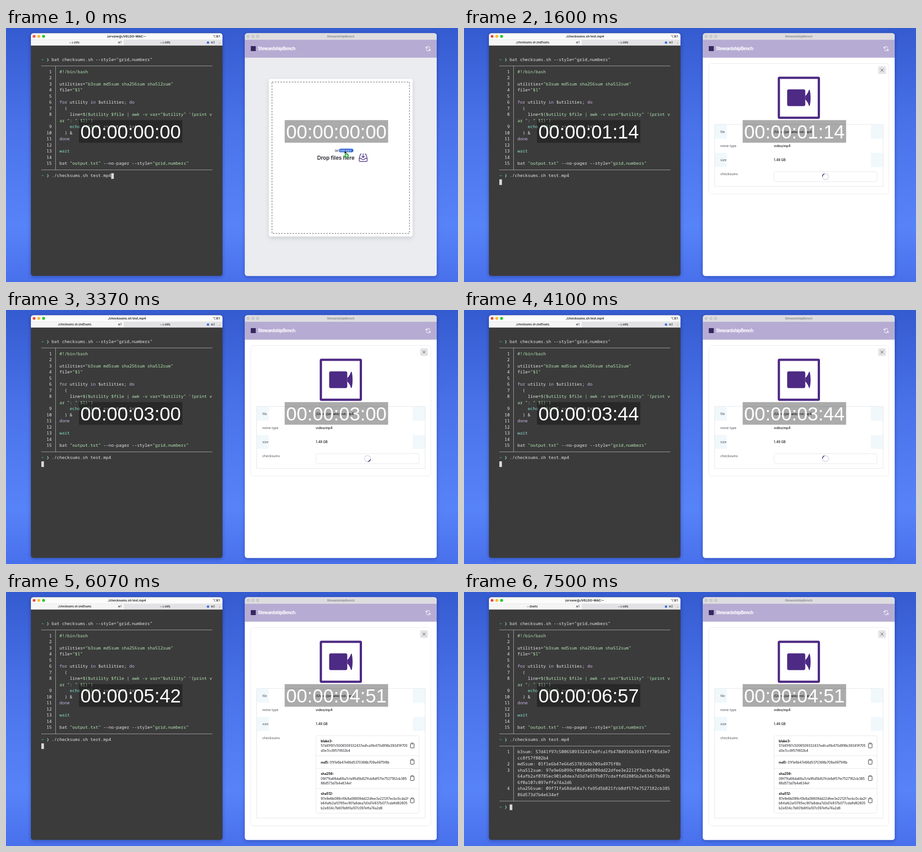
Animation of 998 by 561 pixels, one loop 8.82 s. Source, as an HTML page:

```html
<!DOCTYPE html>
<html lang="en">
<head>
<meta charset="utf-8">
<title>Checksum race</title>
<style>
html, body { margin: 0; width: 100%; height: 100%; overflow: hidden; background: #4c75ec; }
svg { display: block; width: 100vw; height: 100vh; }
text { white-space: pre; font-family: Inter, "DejaVu Sans", sans-serif; }
.mono { font: 500 9.524px "Noto Sans Mono", "DejaVu Sans Mono", monospace; }
.clock { font: 42px "Liberation Sans", Arial, sans-serif; fill: #fff; }
</style>
</head>
<body>
<svg id="stage" viewBox="0 0 998 561" xmlns="http://www.w3.org/2000/svg"></svg>
<script>
const LOOP = 8820, START = 366, FRAME = 1000 / 30;
const LEFT_STOP = 417, RIGHT_STOP = 291;
const CELL = 5.714, ROW = 13.5, WRAP = 59;
const INK = { t: '#e8e8e8', s: '#b4e6b4', k: '#cdb2e2', b: '#86dccb', p: '#7fe3b0' };
const USER = 'jorvane';
const SHELL_TITLE = USER + '@JVELDO-MAC:~', RUN = './checksums.sh test.mp4';
const APP = 'StewardshipBench';

const HASH = {
  blake3: '57d41f97c5006509332437edfca1fb470d916b39341ff705d3e7cc8f57f802b4',
  md5: '01f1e6b47e66d5370366b709a4975f8b',
  sha256: '09f71fa68da68a7cfa95d5b821fcb8df57fe7527182cb38586d573d7b4e634ef',
  sha512: '97e9e6b099cf0b8a06809dd22dfee3e2212f7ecbc0cda2fb64afb2af0785ec901a8dea7d3d7e937b077cdaffd92805b2e834c7b601b6f0a107c097effa74a2d6'
};

// Each line: number, then ink and text in turn.
const CODE = [
  [1, 's', '#!/bin/bash'],
  [2],
  [3, 't', 'utilities=', 's', '"b3sum md5sum sha256sum sha512sum"'],
  [4, 't', 'file=', 's', '"$1"'],
  [5],
  [6, 'k', 'for', 't', ' utility ', 'k', 'in', 't', ' $utilities; ', 'k', 'do'],
  [7, 't', '  ('],
  [8, 't', '    line=', 's', '$($utility $file | awk -v var="$utility" \'{print v'],
  ['', 's', 'ar ": " $1}\')'],
  [9, 'b', '    echo ', 's', '"$line"', 't', ' >> output.txt'],
  [10, 't', '  ) &'],
  [11, 'k', 'done'],
  [12],
  [13, 'b', 'wait'],
  [14],
  [15, 't', 'bat ', 's', '"output.txt"', 't', ' --no-pager --style=', 's', '"grid,numbers"']
];

const esc = s => String(s).replace(/&/g, '&amp;').replace(/</g, '&lt;').replace(/>/g, '&gt;');
const col = c => 78 + c * CELL;
const rowY = r => 69.5 + r * ROW;
const chunks = (s, n) => s.match(new RegExp('.{1,' + n + '}', 'g'));

function rect(x, y, w, h, fill, extra = '') {
  return `<rect x="${x}" y="${y}" width="${w}" height="${h}" fill="${fill}" ${extra}/>`;
}
function label(x, y, size, fill, s, extra = '') {
  return `<text x="${x}" y="${y}" font-size="${size}" fill="${fill}" ${extra}>${esc(s)}</text>`;
}
function dot(x, y, r, fill, extra = '') {
  return `<circle cx="${x}" cy="${y}" r="${r}" fill="${fill}" ${extra}/>`;
}
function path(d, stroke, width = 1, extra = '') {
  return `<path d="${d}" fill="none" stroke="${stroke}" stroke-width="${width}" ${extra}/>`;
}
function mono(c, r, runs, extra = '') {
  let s = '';
  for (let i = 0; i < runs.length; i += 2) s += `<tspan fill="${INK[runs[i]]}">${esc(runs[i + 1])}</tspan>`;
  return `<text class="mono" x="${col(c)}" y="${rowY(r) + 3.4}" ${extra}>${s}</text>`;
}
const MID = 'text-anchor="middle"', BOLD = 'font-weight="600"';

function prompt(r, cmd) {
  return mono(0, r, ['b', '~']) + mono(2, r, ['p', '❯']) + mono(4, r, ['t', cmd]);
}
function grid(top, bottom, lines) {
  const y1 = rowY(top) + .8, y2 = rowY(bottom) + .8, x = col(5.5);
  return path(`M78 ${y1}H455.5M78 ${y2}H455.5M${x} ${y1}V${y2}`, '#b5b5b5', .9) +
    lines.map(([n, ...runs], i) =>
      mono(4, top + 1 + i, ['t', n], 'text-anchor="end"') + mono(7, top + 1 + i, runs)).join('');
}
function outputLines() {
  const names = [['b3sum', 'blake3'], ['md5sum', 'md5'], ['sha512sum', 'sha512'], ['sha256sum', 'sha256']];
  return names.flatMap(([tool, key], n) =>
    chunks(tool + ': ' + HASH[key], WRAP).map((s, i) => [i ? '' : n + 1, 't', s]));
}

function terminal() {
  const round = 'M55 38.5V17a5.5 5.5 0 0 1 5.5-5.5H472.5a5.5 5.5 0 0 1 5.5 5.5V38.5Z';
  return rect(55, 11.5, 423, 536, '#3a3a3a', 'rx="5.5" filter="url(#shadow)"') +
    `<path d="${round}" fill="#fbfbfb"/>` +
    rect(55, 26, 205, 12.5, '#f5f5f6') + rect(260, 26, 218, 12.5, '#e3e3e6') +
    path('M55 26H478', '#dcdce0', .6) +
    ['#f25f57', '#f7bd2e', '#2bc840'].map((c, i) => dot(62 + i * 10.5, 18.5, 3.3, c)).join('') +
    dot(62, 18.5, 1, '#8c1a10', 'id="busy"') +
    label(266.5, 20.9, 6.8, '#333', '', MID + ' font-weight="700" id="title"') +
    label(456.5, 20.6, 6.6, '#333', '⌥⌘1', BOLD) +
    label(151, 34.4, 5.8, '#222', '', MID + ' font-weight="600" id="tab"') +
    label(247, 34.3, 5.6, '#333', '⌘1', BOLD) +
    label(351.5, 34.4, 5.8, '#222', '~ (-zsh)', MID + ' font-weight="600"') +
    dot(446, 32.2, 2.6, '#3f6be0') + label(452, 34.3, 5.6, '#333', '⌘2', BOLD) +
    label(469.5, 34.6, 7, '#999', '+') +
    prompt(0, 'bat checksums.sh --style="grid,numbers"') + grid(1, 18, CODE) +
    prompt(19, RUN) +
    `<g id="output">${grid(20, 29, outputLines())}</g><g id="again">${prompt(30, '')}</g>` +
    rect(0, 0, 5.8, 12.4, '#d9d9d9', 'id="caret"');
}

function dropPage() {
  const inbox = 'M784.5 278.5H782.6L779.8 288V293a1.8 1.8 0 0 0 1.8 1.8H795.6a1.8 1.8 0 0 0 1.8-1.8V288L794.6 278.5H792.7M779.8 288H784.5L786 290.6H791.2L792.7 288H797.4M788.6 277.5V286M785.6 283.2L788.6 286.2L791.6 283.2';
  return rect(527.5, 65.5, 423.5, 476, '#ebecf0') + rect(527.5, 530, 423.5, 17.5, '#ebecf0', 'rx="5"') +
    rect(580.5, 112.5, 317, 348, '#fff', 'rx="4" filter="url(#soft)"') +
    rect(587.3, 119.3, 303.6, 334.4, 'none', 'stroke="#555" stroke-dasharray="3.6 2.6"') +
    label(687, 291.2, 11.7, '#26262e', 'Drop files here', BOLD) +
    path(inbox, '#4a2f83', 1.4, 'stroke-linejoin="round" stroke-linecap="round"') +
    `<g id="drag">${rect(726.3, 268.3, 7.4, 5, '#fff', 'stroke="#888" stroke-width=".6"')}
      ${rect(727.3, 270.3, 5.4, 1.8, '#555')}${rect(735, 266.4, 32, 8.2, '#2f66d8', 'rx="4"')}
      ${label(737, 272.7, 6.1, '#fff', 'test.mp4')}</g>` +
    `<path d="M747.3 270V278.4L749.2 276.7L750.5 279.5L751.7 278.9L750.4 276.2H753Z" fill="#111" stroke="#fff" stroke-width=".5"/>` +
    dot(752.2, 281.8, 4.8, '#2fb344') + path('M749.6 281.8H754.8M752.2 279.2V284.4', '#fff', 1.2);
}

function clipboard(y) {
  return `<g transform="translate(897 ${y})">${rect(-4, -4.4, 8, 9.8, 'none', 'rx="1.4" stroke="#222"')}
    ${rect(-2, -5.8, 4, 2.6, '#fff', 'rx=".8" stroke="#222" stroke-width=".9"')}</g>`;
}
function sums() {
  const at = { blake3: [331.7, 339, 48], sha256: [404.1, 411, 48], sha512: [448.2, 460.3, 47] };
  let s = rect(684.5, 317.5, 227.5, 171, '#fff', 'rx="3" stroke="#e4e4e9" stroke-width=".9"') +
    path('M684.5 361.7H912M684.5 389.7H912M684.5 434H912', '#e4e4e9', .9);
  for (const [key, [y, icon, n]] of Object.entries(at)) {
    s += label(695, y, 7.15, '#111', key + ':', 'font-weight="700"') + clipboard(icon);
    // The last digest wraps one character earlier on its lines.
    chunks(HASH[key], n).forEach((part, i) => s += label(695, y + 10.5 * (i + 1), 7.15, '#16161c', part));
  }
  return s + clipboard(375) + `<text x="695" y="378.7" font-size="7.15" fill="#16161c"><tspan font-weight="700">md5:</tspan> ${HASH.md5}</text>`;
}
function panelPage() {
  const rows = [['file', `/Users/${USER}/test.mp4`], ['mime type', 'video/mp4'], ['size', '1.49 GB'], ['checksums', '']];
  const tint = [213.5, 276].map(y => rect(553.5, y, 27, 31, '#f1f8fb') + rect(898, y, 27, 31, '#f1f8fb')).join('');
  return rect(527.5, 65.5, 423.5, 476, '#fff') + rect(527.5, 530, 423.5, 17.5, '#fff', 'rx="5"') +
    rect(540.5, 78.5, 397.5, 0, '#fff', 'id="card" rx="6" stroke="#e8e8ee" stroke-width=".9"') +
    tint + rect(553.5, 213, 371.7, 0, 'none', 'id="table" stroke="#dfe2e8" stroke-width=".9"') +
    rect(914.5, 84.5, 17, 17, '#e4e4e8', 'rx="3"') + path('M919.7 89.7L926.3 96.3M926.3 89.7L919.7 96.3', '#555') +
    rect(695.2, 110, 88.3, 88.3, '#fff', 'rx="1.5" stroke="#4d2a84" stroke-width="5"') +
    rect(713.5, 135.5, 40, 37, '#4d2a84', 'rx="4"') +
    '<path d="M753.5 150Q758.5 146 761.8 136.5H763.5Q767.2 154 763.5 172H761.8Q758.5 162 753.5 158Z" fill="#4d2a84"/>' +
    rows.map(([k, v], i) => label(566, 231.6 + i * 31.2, 7.15, '#4a4a55', k) + label(684, 231.6 + i * 31.2, 7.15, '#111', v, 'font-weight="500"')).join('') +
    `<g id="wait">${rect(684.5, 317.5, 227.5, 21.8, '#fff', 'rx="3" stroke="#e4e4e9" stroke-width=".9"')}
      ${dot(798.2, 328.2, 6.7, 'none', 'stroke="#d8d5e3" stroke-width="1.6"')}
      ${path('M791.5 328.2A6.7 6.7 0 0 1 796 321.9', '#3d2a66', 1.6, 'id="spin"')}</g>` +
    `<g id="sums">${sums()}</g>`;
}

function app() {
  const bar = 'M527.5 26V17a5.5 5.5 0 0 1 5.5-5.5H945.5a5.5 5.5 0 0 1 5.5 5.5V26Z';
  return rect(527.5, 11.5, 423.5, 536, '#ebecf0', 'rx="5.5" filter="url(#shadow)"') +
    `<g id="drop">${dropPage()}</g><g id="panel">${panelPage()}</g>` +
    `<path d="${bar}" fill="#dddcdf"/>` +
    [534.7, 545.2, 555.7].map(x => dot(x, 18.5, 2.9, '#cfcfd2', 'stroke="#b2b2b6" stroke-width=".7"')).join('') +
    label(739, 20.9, 6.6, '#8d8d92', APP, MID + ' font-weight="700"') +
    rect(527.5, 26, 423.5, 39.5, '#b6acd3') +
    rect(540.5, 40, 11, 11, '#35265f') +
    label(556.5, 49.2, 9.8, '#fff', APP, 'font-weight="700" letter-spacing="-.5"') +
    path('M927.6 44.8A4.5 4.5 0 0 1 936 43.6M927.4 41.2V44.8H931M936.4 46.8A4.5 4.5 0 0 1 928 48M936.6 50.4V46.8H933', '#fff', 1.1);
}

function clock(x, id) {
  return rect(x, 203.4, 228.4, 50, '#000', 'fill-opacity=".33"') +
    `<text class="clock" id="${id}" x="${x + 3.2}" y="243.7"></text>`;
}

const stops = [[0, '#355bd0'], [.4, '#4a73ea'], [.78, '#5783f8'], [1, '#4870ec']];
document.getElementById('stage').innerHTML =
  `<defs><linearGradient id="sky" x2="0" y2="1">${stops.map(([o, c]) => `<stop offset="${o}" stop-color="${c}"/>`).join('')}</linearGradient>
  <filter id="shadow" x="-10%" y="-10%" width="120%" height="120%"><feDropShadow dx="0" dy="2" stdDeviation="4" flood-color="#0a1a50" flood-opacity=".35"/></filter>
  <filter id="soft" x="-10%" y="-10%" width="120%" height="120%"><feDropShadow dx="0" dy="4" stdDeviation="5" flood-color="#000" flood-opacity=".13"/></filter></defs>` +
  rect(0, 0, 998, 561, 'url(#sky)') + terminal() + app() + clock(161, 'left') + clock(615.3, 'right');

const $ = id => document.getElementById(id);
const show = (id, on) => $(id).setAttribute('display', on ? 'inline' : 'none');
const two = n => String(n).padStart(2, '0');
const stamp = ticks => `00:00:${two(Math.floor(ticks / 60))}:${two(ticks % 60)}`;

function draw(t) {
  const n = Math.floor((t - START) / FRAME), ticks = Math.max(0, 2 * n);
  const started = n >= 0, hashed = ticks >= RIGHT_STOP, printed = ticks >= LEFT_STOP;
  const again = t >= 7370, idle = !started || t >= 7500;

  $('left').textContent = stamp(Math.min(ticks, LEFT_STOP));
  $('right').textContent = stamp(Math.min(ticks, RIGHT_STOP));
  $('title').textContent = idle ? SHELL_TITLE : RUN;
  $('tab').textContent = !started ? '~ (-zsh)' : idle ? '~ (bash)' : './checksums.sh (md5sum)';
  show('busy', started);
  show('output', printed);
  show('again', again);

  const [c, r] = !started ? [27, 19] : again ? [4, 30] : [0, 20];
  show('caret', !printed || again);
  $('caret').setAttribute('x', col(c));
  $('caret').setAttribute('y', rowY(r) - 5.2);

  const fade = Math.min(1, Math.max(0, (START + n * FRAME - 460) / 200));
  show('drop', fade < 1);
  show('drag', t < 170);
  show('panel', fade > 0);
  $('panel').setAttribute('opacity', fade);
  show('wait', !hashed);
  show('sums', hashed);
  $('card').setAttribute('height', hashed ? 438 : 288.3);
  $('table').setAttribute('height', hashed ? 286.3 : 137);
  $('spin').setAttribute('transform', `rotate(${(n * FRAME + START - 1600) * .72} 798.2 328.2)`);
}

function tick() {
  draw(performance.now() % LOOP);
  requestAnimationFrame(tick);
}
tick();
</script>
</body>
</html>
```
